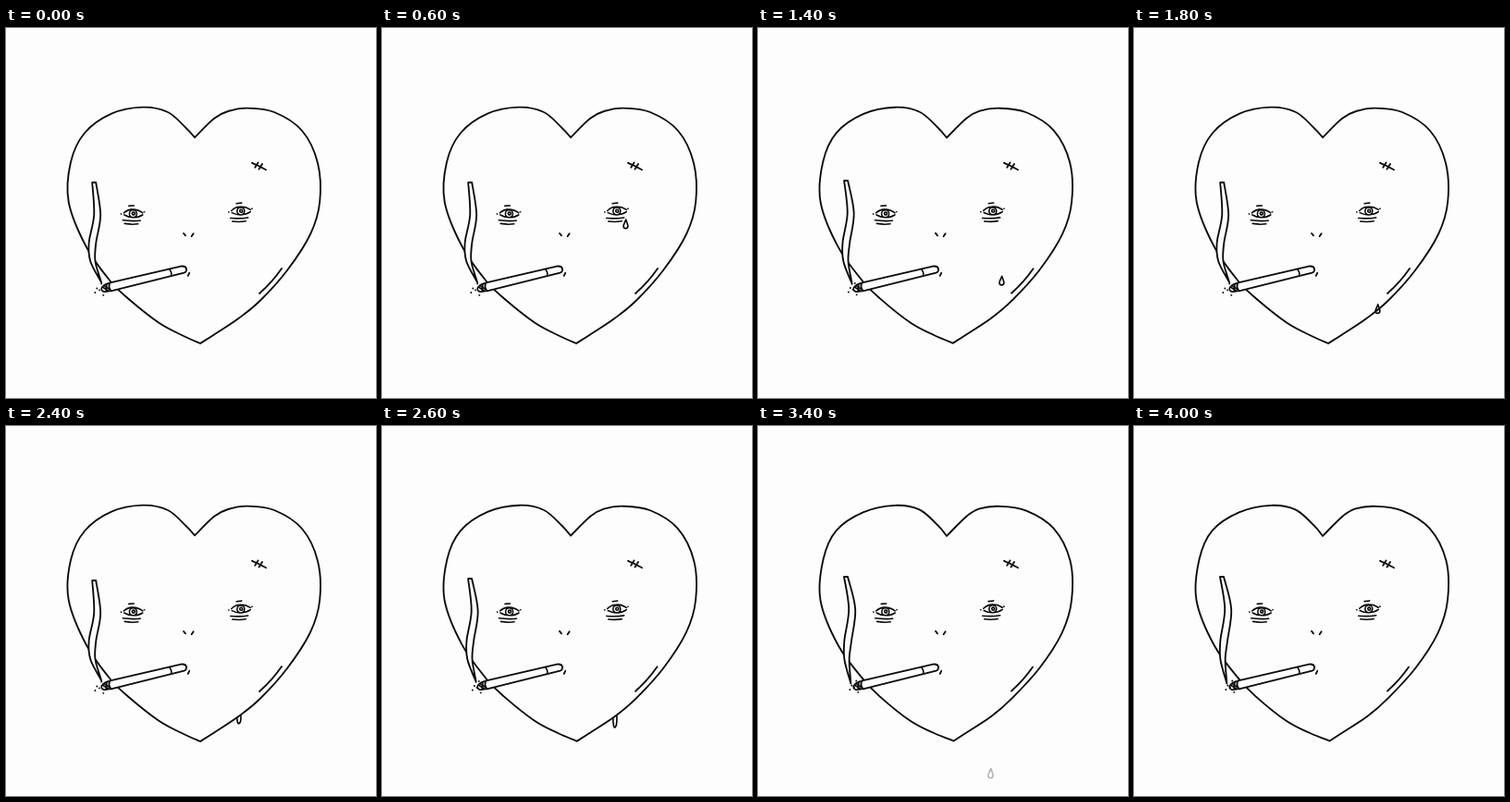
An HTML page that plays this animation: 400x400 px, repeating every 4.2 s.

```html
<!DOCTYPE html>
<html lang="en">
<head>
<meta charset="utf-8">
<title>Tired heart</title>
<style>
  html, body { margin: 0; width: 100%; height: 100%; overflow: hidden; background: #fdfdfd; }
  svg { display: block; width: 100vw; height: 100vh; }
  path { fill: none; stroke: #0a0a0a; stroke-width: 1.85; stroke-linecap: round; stroke-linejoin: round; }
  .paper { fill: #fdfdfd; }
  .thin { stroke-width: 1.6; }
</style>
</head>
<body>
<svg viewBox="0 0 400 400">
  <path id="tear" class="paper thin"/>
  <path id="heart"/>
  <path id="shine"/>
  <path id="smoke" class="paper"/>
  <path class="paper" d="M112.5 275.4L189 257.6Q194 256.8 195 260.2Q195.4 263.8 192.5 264.6L113.5 284.4Q110 280 112.5 275.4Z"/>
  <path class="thin" d="M176.6 260.6Q179.6 264 178.6 268"/>
  <path id="ember" class="thin" d="M112.5 275.6Q106 276.5 103.2 281.2Q103 285 107 285.2L113.5 284.3M105 280.5L110.5 284M106 278.5L112 282.5M109 277.3L108 284.5"/>
  <path id="sparks"/>
  <path id="marks"/>
  <path id="eyes" class="thin"/>
</svg>
<script>
const STEP = 200, COUNT = 21;
const $ = id => document.getElementById(id);
const draw = (id, d) => $(id).setAttribute('d', d);
const points = s => s.split(' ').map(p => p.split(',').map(Number));

// key points, both sides running from the cleft to the tip
const leftSide = points('204,118.3 194.5,108 175,91 148,85.6 114,92.6 85,113.5 70,145 67.7,188 87,237 113,274 132,292.5 165,318.5 190,332 210,341');
const rightSide = points('204,118.3 225,97.8 240,90 261,86.6 290,91 320,111 337,146 339.2,188 329,223 304,262 275,294.5 252,313.5 225,331.5 210,341');
const smokeLow = points('95.2,167 98.7,202 93.5,232 93.8,252 102,272.5');
const smokeHigh = points('95,163 101.7,198 97.2,232 96,252 99.8,275.5');
const sparks = points('96.3,286 98.3,281.5 105.2,288.8 101,283.3 103.2,276.4');

// smooth curve through the points
function curve(pts) {
  const at = i => pts[Math.max(0, Math.min(pts.length - 1, i))];
  let d = 'M' + pts[0];
  for (let i = 0; i < pts.length - 1; i++) {
    const [a, b, c, e] = [-1, 0, 1, 2].map(j => at(i + j));
    const c1 = b.map((v, j) => v + (c[j] - a[j]) / 6);
    const c2 = c.map((v, j) => v - (e[j] - b[j]) / 6);
    d += `C${c1} ${c2} ${c}`;
  }
  return d;
}

// a slightly redrawn side: small wobble, tip slides right
const redraw = (side, k) => side.map(([x, y], i) => {
  const tip = i === side.length - 1 ? 2 : 0;
  return [x + k * (tip + .5 * Math.sin(i * 2.3)), y + k * .6 * Math.cos(i * 1.7)];
});

function ribbon(k) {
  const spine = smokeLow.map((p, i) => p.map((v, j) => v + (smokeHigh[i][j] - v) * k));
  const edge = side => spine.map(([x, y], i) => {
    const u = i / (spine.length - 1);
    return [x + side * (2 - 1.7 * u + 2.7 * Math.sin(Math.PI * u)), y];
  });
  return curve([...edge(-1), ...edge(1).reverse()]) + 'Z';
}

const circle = (x, y, r) => `M${x - r} ${y}a${r} ${r} 0 1 0 ${2 * r} 0a${r} ${r} 0 1 0 ${-2 * r} 0`;

function eye(x, y, tilt) {
  const p = (dx, dy) => `${x + dx} ${y + dy - dx * tilt}`;
  return `M${p(-4, -8.4)}L${p(1.5, -8.8)}` +
    `M${p(-9.5, -1)}Q${p(-5, -5)} ${p(0, -4.7)}Q${p(6, -4.8)} ${p(11, -1)}` +
    `M${p(-9, 1.2)}Q${p(-4, 4.2)} ${p(1, 4)}Q${p(7, 4)} ${p(11, 1.2)}` +
    circle(x + .6, y, 4) + circle(x + 1, y - .2, 1.5) +
    `M${p(-12.5, .3)}h.3M${p(12.6, -2)}h.3` +
    `M${p(-10.5, 7)}Q${p(0, 8.4)} ${p(8.5, 7.4)}` +
    `M${p(-8.5, 10.6)}Q${p(-1, 12)} ${p(6, 11)}`;
}

function drop(x, y, s) {
  const p = (dx, dy) => `${x + dx * s} ${y + dy * s}`;
  return `M${p(.3, -5.4)}C${p(-.6, -2)} ${p(-2.7, 0)} ${p(-2.6, 2.6)}` +
    `C${p(-2.3, 6)} ${p(2.7, 6)} ${p(2.7, 2.2)}C${p(2.6, 0)} ${p(1.2, -2)} ${p(.3, -5.4)}Z`;
}

// bead hanging from the lower right edge
const bead = (x, y, len) =>
  `M${x - 2} ${y + 1.4}C${x - 2.6} ${y + len + 1.5} ${x + 2.6} ${y + len + 1.5} ${x + 2} ${y - 1.4}`;

// rolls down the cheek, slides along the edge, then falls and fades
function tear(n) {
  if (n < 2 || n > 17) return '';
  if (n < 10) return drop(263.4, 212 + (n - 3) * 15.3, n < 3 ? .6 : .92);
  if (n < 14) {
    const slide = Math.min(3, n - 9);
    return bead(263 - slide * 3.7, 304 + slide * 3.4, 6 + .3 * (n - 10) ** 3);
  }
  return drop(251.4, 351.5 + (n - 15) * 12, .98);
}

function render(n) {
  const k = (n % 3) / 2;
  const grey = Math.max(0, n - 13) * 45;
  draw('heart', curve(redraw(leftSide, k)) + curve(redraw(rightSide, k)));
  draw('smoke', ribbon(k));
  draw('shine', `M${298 - k} ${260 + k * .6}Q${288 - k * .5} 274.5 274 ${287 - k * .5}`);
  draw('sparks', sparks.map(([x, y]) => `M${x + 3 * k} ${y - k}h.1`).join(''));
  draw('marks', 'M266 145.8L273 149L281 153.2M269.2 150.8L272.5 145.4M273.5 152.6L277 147' +
    `M192 ${222 - k * .3}L194 224.4M202.6 222.2L200.6 225.2M198.2 264.8L196.7 267.8`);
  draw('eyes', eye(136.8 + k * .4, 200.8, 0) + eye(253.2, 198 - k * .2, .05));
  draw('tear', tear(n));
  $('tear').style.stroke = `rgb(${grey},${grey},${grey})`;
}

const start = performance.now();
let shown = -1;
function tick(now) {
  const n = Math.floor(Math.max(0, now - start) / STEP) % COUNT;
  if (n !== shown) render(shown = n);
  requestAnimationFrame(tick);
}
tick(start);
</script>
</body>
</html>
```
